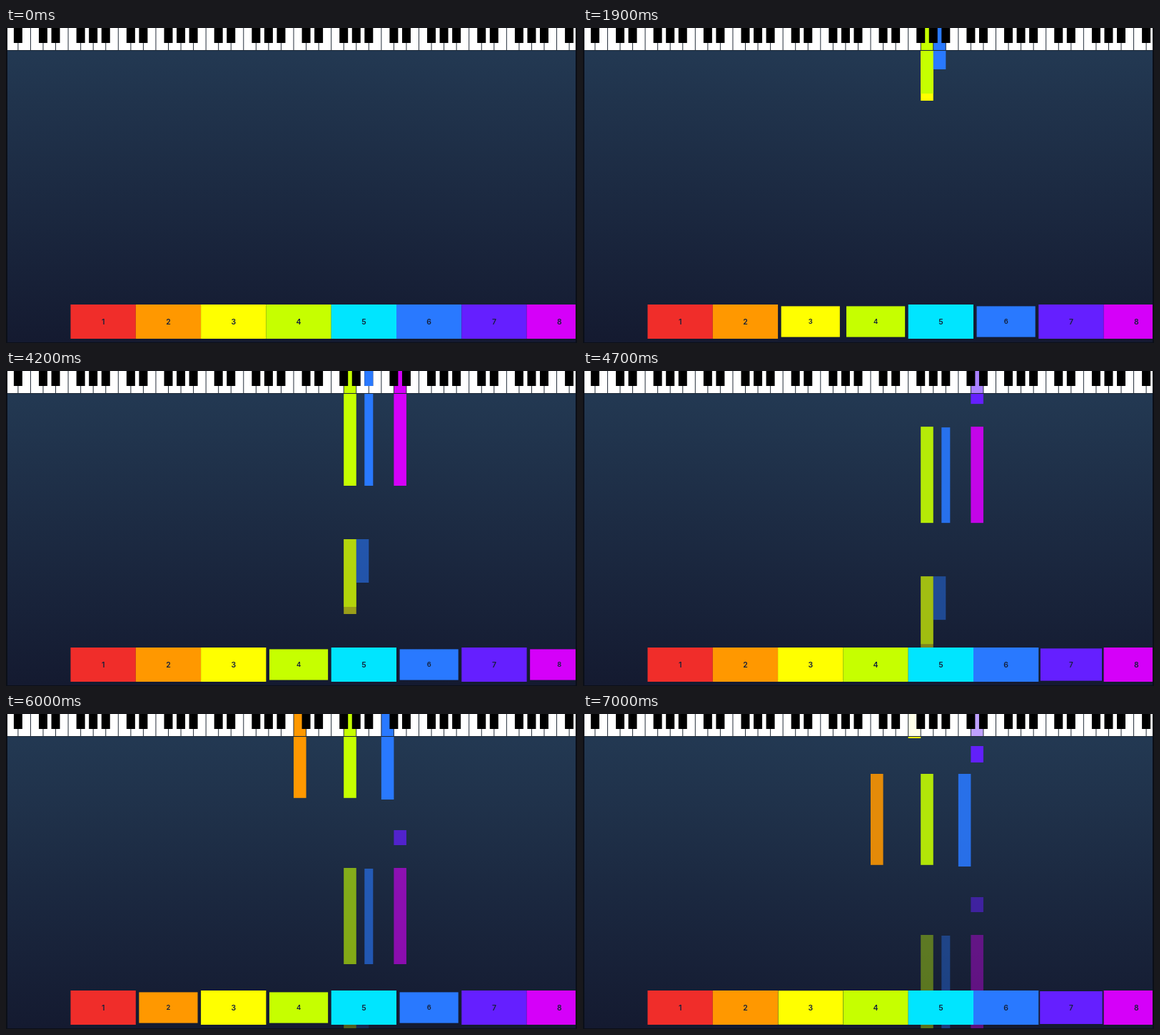
Write an HTML page that moves like this. It is 800 px wide and 442 px high and loops after 7.1 s.

```html
<!DOCTYPE html>
<html lang="en">
<head>
<meta charset="utf-8">
<title>Piano roll</title>
<style>
  html, body { margin: 0; width: 100%; height: 100%; overflow: hidden; background: #0b0f18; }
  svg { display: block; width: 800px; height: 442px; }
  text { font: 600 10.5px Inter, "Open Sans", sans-serif; fill: #14203a; text-anchor: middle; }
</style>
</head>
<body>
<svg id="stage" viewBox="0 0 800 442">
  <defs>
    <linearGradient id="sky" x1="0" y1="0" x2="0" y2="1">
      <stop offset="0" stop-color="#243b55"/>
      <stop offset="1" stop-color="#141a30"/>
    </linearGradient>
    <clipPath id="frame"><rect x="2" width="796" height="441"/></clipPath>
  </defs>
  <g clip-path="url(#frame)">
    <rect width="800" height="442" fill="url(#sky)"/>
    <g id="bars"></g>
    <g id="whites"></g>
    <g id="blacks"></g>
    <g id="pads"></g>
  </g>
</svg>
<script>
const LOOP = 7100, TICK = 100;
const RAMP = 240;      // press and release transition, ms
const FADE = 4500;     // life of a released bar, ms
const KEY_X = 16.9, KEY_W = 17.55, BLACK_W = 12, BLACK_H = 21, KEYS_H = 32;
const PAD_X = 90.5, PAD_W = 91.3, PAD_Y = 388, PAD_H = 48;
const COLORS = ["#f02d2a", "#ff9800", "#ffff00", "#c6ff00", "#00e5ff", "#2979ff", "#651fff", "#d500f9"];

// Scroll distance over time: [ms, px]
const SCROLL = [[0, -199.5], [1900, 0], [3100, 123], [4200, 239], [5200, 343.3], [6000, 429], [7100, 532.4]];

// [pad, key, black?, scroll at press, scroll at release]
const NOTES = [
  [3, 26, 0, -70, 35], [4, 26, 0, -60, 35], [6, 27, 0, -26, 35],
  [4, 26, 0, 110, 245], [6, 28, 1, 110, 244], [8, 30, 0, 110, 245],
  [7, 30, 0, 277, 298],
  [6, 29, 0, 341, 471], [2, 22, 0, 343.2, 471], [4, 26, 0, 343.2, 471],
  [7, 30, 0, 487, 510],
  [3, 25, 0, 521, 999]
];

const clamp = v => Math.max(0, Math.min(1, v));
const byId = id => document.getElementById(id);

function add(parent, tag, attrs) {
  const el = document.createElementNS("http://www.w3.org/2000/svg", tag);
  for (const k in attrs) el.setAttribute(k, attrs[k]);
  return parent.appendChild(el);
}

function rect(parent, x, y, width, height, fill) {
  return add(parent, "rect", { x, y, width, height, fill });
}

// Piecewise linear lookup from column a to column b, extended past the end
function lookup(v, a, b) {
  let i = 1;
  while (i < SCROLL.length - 1 && v > SCROLL[i][a]) i++;
  const p = SCROLL[i - 1], q = SCROLL[i];
  return p[b] + (v - p[a]) * (q[b] - p[b]) / (q[a] - p[a]);
}
const scrollAt = t => lookup(t, 0, 1);
const timeAt = s => lookup(s, 1, 0);

const whites = byId("whites"), blacks = byId("blacks");
const keyLeft = n => KEY_X + n * KEY_W;
const blackLeft = n => keyLeft(n) - BLACK_W / 2;

rect(whites, 0, 0, 800, KEYS_H, "#fff");
for (let n = 0; n < 46; n++) {
  if (n % 7 !== 1 && n % 7 !== 4) rect(blacks, blackLeft(n), 0, BLACK_W, BLACK_H, "#000");
}

const notes = NOTES.map(([pad, key, black, start, end]) => {
  const x = black ? blackLeft(key) : keyLeft(key);
  const w = black ? BLACK_W : KEY_W;
  const fill = COLORS[pad - 1];
  return {
    pad, start, end, on: timeAt(start), off: timeAt(end),
    bar: rect(byId("bars"), x, KEYS_H, w, 0, fill),
    glow: rect(black ? blacks : whites, x, 0, w, black ? BLACK_H : KEYS_H, fill)
  };
});

for (let n = 0; n < 46; n++) rect(whites, keyLeft(n) - 0.5, 0, 1, KEYS_H, "#26303c");
rect(whites, 0, KEYS_H - 1, 800, 1, "#1b2735");

const pads = COLORS.map((fill, i) => {
  const g = add(byId("pads"), "g", {});
  rect(g, -PAD_W / 2, -PAD_H / 2, PAD_W, PAD_H, fill);
  add(g, "text", { x: 0, y: 3.8 }).textContent = i + 1;
  return g;
});

function draw(t) {
  const s = scrollAt(t);
  const pressed = COLORS.map(() => 0);
  for (const n of notes) {
    const level = clamp((t - n.on) / RAMP) - clamp((t - n.off) / RAMP);
    const top = Math.max(0, s - n.end);
    n.bar.setAttribute("y", KEYS_H + top);
    n.bar.setAttribute("height", Math.max(0, s - n.start - top));
    n.bar.setAttribute("opacity", clamp(1 - Math.max(0, t - n.off) / FADE));
    n.glow.setAttribute("opacity", clamp(level));
    pressed[n.pad - 1] = Math.max(pressed[n.pad - 1], level);
  }
  pads.forEach((g, i) => {
    const x = PAD_X + (i + 0.5) * PAD_W, y = PAD_Y + PAD_H / 2;
    g.setAttribute("transform", `translate(${x} ${y}) scale(${1 - 0.1 * pressed[i]})`);
  });
}

function tick() {
  const step = Math.floor((performance.now() + 20) / TICK);
  draw(step * TICK % LOOP);
  requestAnimationFrame(tick);
}
draw(0);
requestAnimationFrame(tick);
</script>
</body>
</html>
```
